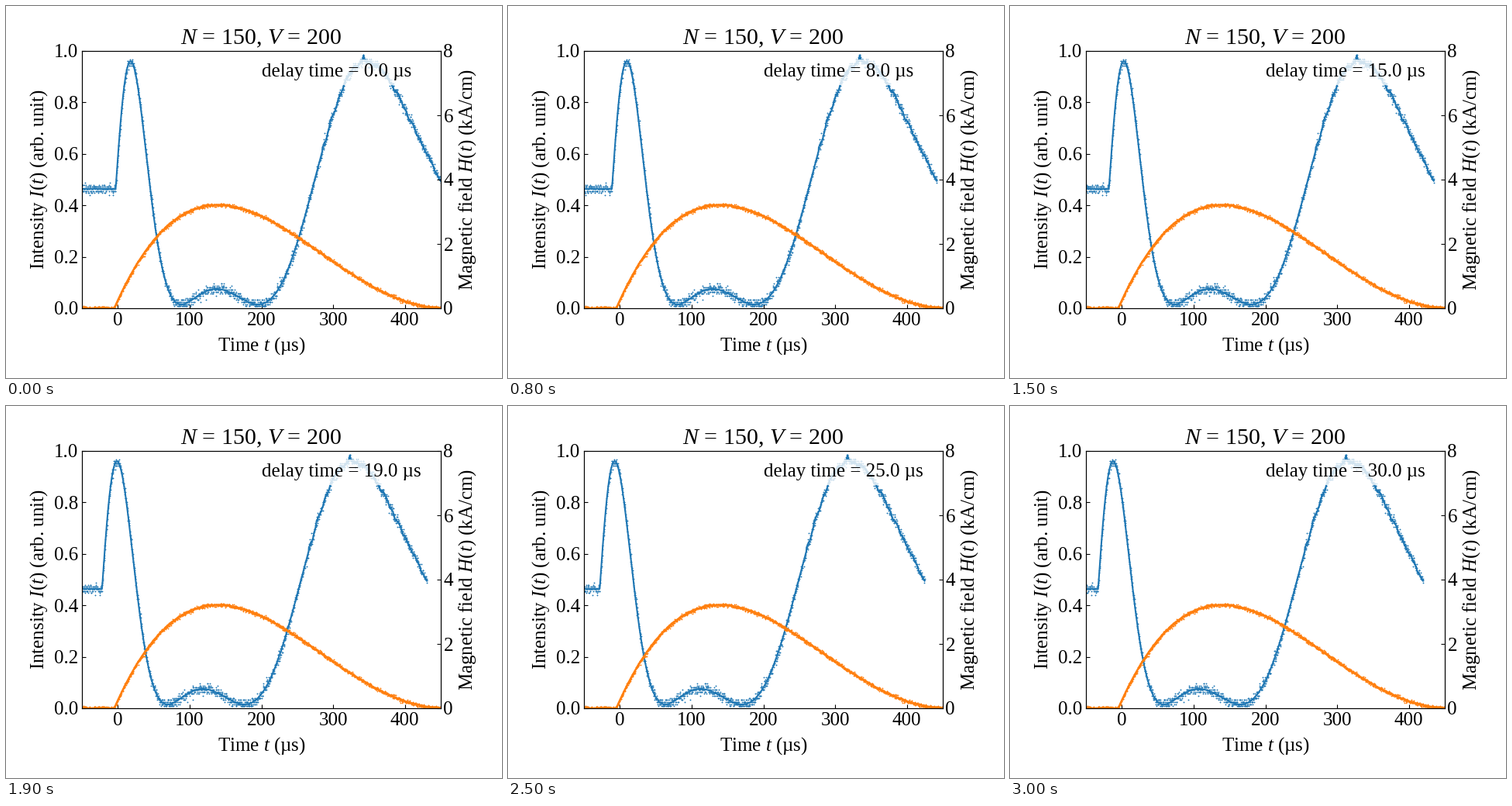
Animation of 640x480 px, one loop 3.1 s. Source, as a matplotlib script:

```python
import numpy as np
import matplotlib.pyplot as plt
from matplotlib.animation import FuncAnimation

plt.rcParams.update({
    "font.family": "Liberation Serif",
    "font.size": 18,
    "mathtext.fontset": "custom",
    "mathtext.rm": "Liberation Serif",
    "mathtext.it": "Liberation Serif:italic",
    "xtick.direction": "in",
    "ytick.direction": "in",
})

W, H, DPI = 640, 480, 100
LEFT, RIGHT, TOP, BOTTOM = 98, 561, 58, 390
STEPS = 31
BLUE, ORANGE = "tab:blue", "tab:orange"


def damped_pulse(t, start=-3, half_period=460, decay=0.0048):
    """Damped half sine, scaled to a peak of one."""
    w = np.pi / half_period
    tau = np.clip(t - start, 0, half_period)
    peak = np.arctan2(w, decay) / w
    shape = lambda s: np.sin(w * s) * np.exp(-decay * s)
    return shape(tau) / shape(peak)


def coil_pulse(t, start=-5, length=466, fall=2.23):
    """Near-linear rise and slow tail, scaled to a peak of one."""
    u = np.clip((t - start) / length, 0, 1)
    peak = 1 / (1 + fall)
    return u * (1 - u) ** fall / (peak * (1 - peak) ** fall)


def measured(signal, noise, step):
    """Noisy samples rounded to the digitiser's levels."""
    return np.round((signal + rng.normal(0, noise, signal.size)) / step) * step


rng = np.random.default_rng(4)
t = np.arange(-55, 450.1, 0.3)

# The intensity is the squared sine of a phase that follows the pulse
phase = np.radians(43.6 + 151 * damped_pulse(t))
signal = 0.015 + 0.945 * np.sin(phase) ** 2
wobble = np.convolve(rng.normal(0, 0.02, t.size), np.ones(15) / 15, "same")
signal += wobble * (t > 285) + 0.02 * np.exp(-((t - 342.5) / 1.2) ** 2)
intensity = np.maximum(measured(signal, 0.010, 0.008), 0.008)

field_line = 3.21 * coil_pulse(t)
field = measured(field_line, 0.03, 0.02)

fig = plt.figure(figsize=(W / DPI, H / DPI), dpi=DPI, facecolor="white")
ax = fig.add_axes([LEFT / W, 1 - BOTTOM / H, (RIGHT - LEFT) / W, (BOTTOM - TOP) / H])
ax.set(xlim=(-50, 450), ylim=(0, 1), xticks=range(0, 401, 100))
ax.set_xlabel("Time $t$ (\u00b5s)", labelpad=6)
ax.set_ylabel("Intensity $I(t)$ (arb. unit)", labelpad=4)
ax.set_title("$N$ = 150, $V$ = 200")

twin = ax.twinx()
twin.set(ylim=(0, 8), yticks=range(0, 9, 2))
twin.set_ylabel("Magnetic field $H(t)$ (kA/cm)", labelpad=4)
twin.tick_params(axis="y", direction="in", pad=2.5)

dots = dict(ls="none", marker="+", mew=0.6)
blue_dots, = ax.plot([], [], color=BLUE, ms=1.9, **dots)
blue_line, = ax.plot([], [], color=BLUE, lw=1.5)
twin.plot(t, field, color=ORANGE, ms=1.6, **dots)
twin.plot(t, field_line, color=ORANGE, lw=1.8)
label = ax.text(200, 0.9, "", bbox=dict(facecolor="white", edgecolor="none", alpha=0.8))


def draw(delay):
    blue_dots.set_data(t - delay, intensity)
    blue_line.set_data(t - delay, signal)
    label.set_text(f"delay time = {delay:.1f} \u00b5s")
    return blue_dots, blue_line, label


anim = FuncAnimation(fig, draw, frames=STEPS, interval=100, repeat=True, repeat_delay=0)
plt.show()
```
